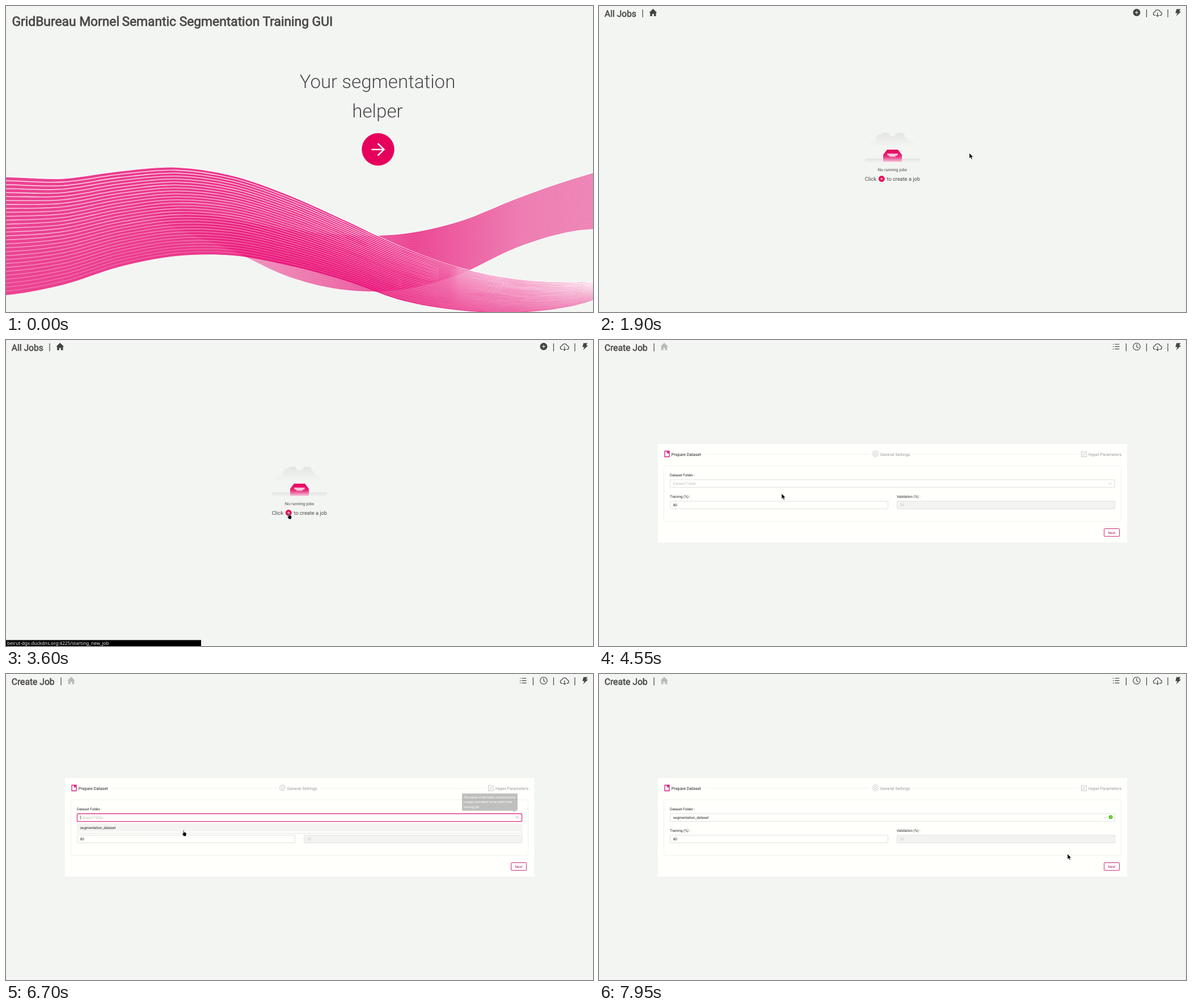
An HTML page that plays this animation: 1035 px wide and 541 px high, repeating every 8 s.

```html
<!DOCTYPE html>
<html lang="en">
<head>
<meta charset="utf-8">
<title>Segmentation helper</title>
<style>
  html, body { margin: 0; width: 100%; height: 100%; overflow: hidden; background: #f3f5f3; }
  svg { display: block; }
  text { font: 6.3px Roboto, sans-serif; fill: #222; text-rendering: geometricPrecision; white-space: pre; }
  .bold { fill: #4a4a46; stroke: #4a4a46; stroke-width: .035em; }
  .title { font-size: 22.8px; }
  .head { font-size: 15.7px; }
  .lead { font-size: 33.1px; font-weight: 300; fill: #4a4a4a; text-anchor: middle; }
  .step { font-size: 7.25px; }
  .hint { font-size: 9.25px; fill: #4a4a4a; }
  .pale { fill: #bfbfbd; }
  .url { font: 8.2px "Noto Sans", sans-serif; fill: #eee; }
  .tip { fill: #fff; }
  .box { fill: #fffffc; stroke: #d9d9d7; stroke-width: .8; }
  .line { fill: none; stroke: #444; stroke-width: 1.2; }
  .thin { fill: none; stroke: #b8b8b6; stroke-width: .8; }
  .rule { fill: none; stroke: #f0f0ed; }
</style>
</head>
<body>
<svg width="1035" height="541" viewBox="0 0 1035 541">
  <defs>
    <linearGradient id="frontFill" gradientUnits="userSpaceOnUse" x2="1035">
      <stop stop-color="#e8006e" stop-opacity=".72"/>
      <stop offset=".3" stop-color="#e8006e" stop-opacity=".77"/>
      <stop offset=".66" stop-color="#e8006e" stop-opacity=".82"/>
      <stop offset=".85" stop-color="#e8006e" stop-opacity=".7"/>
      <stop offset="1" stop-color="#e8006e" stop-opacity=".5"/>
    </linearGradient>
    <linearGradient id="backFill" gradientUnits="userSpaceOnUse" x1="200" x2="1035">
      <stop stop-color="#e8006e" stop-opacity="0"/>
      <stop offset=".26" stop-color="#e8006e" stop-opacity=".4"/>
      <stop offset=".45" stop-color="#e8006e" stop-opacity=".55"/>
      <stop offset=".62" stop-color="#e8006e" stop-opacity=".72"/>
      <stop offset=".85" stop-color="#e8006e" stop-opacity=".5"/>
      <stop offset="1" stop-color="#e8006e" stop-opacity=".46"/>
    </linearGradient>
    <linearGradient id="lineFade" gradientUnits="userSpaceOnUse" x2="1035">
      <stop stop-color="#fff"/>
      <stop offset=".4" stop-color="#fff" stop-opacity=".85"/>
      <stop offset=".6" stop-color="#fff" stop-opacity=".8"/>
      <stop offset="1" stop-color="#fff" stop-opacity=".9"/>
    </linearGradient>
    <linearGradient id="mist" x2="0" y2="1">
      <stop stop-color="#e4e5e3"/><stop offset="1" stop-color="#f3f5f3"/>
    </linearGradient>
    <linearGradient id="tray" x2="0" y2="1">
      <stop stop-color="#e6005c"/><stop offset=".55" stop-color="#ea2b7b"/><stop offset="1" stop-color="#f6c3d8"/>
    </linearGradient>
  </defs>

  <g id="welcome">
    <g id="waves"></g>
    <text class="bold title" x="10.5" y="34.5">GridBureau Mornel</text>
    <text class="bold title" x="204.5" y="34.5">Semantic Segmentation Training GUI</text>
    <text class="lead" x="655" y="145">Your segmentation</text>
    <text class="lead" x="655" y="196.5">helper</text>
    <circle id="start" cx="656" cy="253.5" r="28.7"/>
    <path d="M644.5 253.7H667M655.5 243l11 10.7-11 10.7" fill="none" stroke="#fff" stroke-width="2.5"/>
  </g>

  <g id="tools">
    <path class="line" d="M965.5 6v14M1003 6v14"/>
    <path class="line" d="M981.5 16.5h-1a3 3 0 0 1-.3-6a4.8 4.8 0 0 1 9.3 0a3 3 0 0 1-.3 6h-1.2M984.8 11.5v7M982.6 16.3l2.2 2.2 2.2-2.2"/>
    <path d="M1018.3 5.5h7l-2.3 4.2h3.3l-8.6 8.3 2.1-5.5h-3.5z" fill="#444"/>
  </g>

  <g id="jobs">
    <text class="bold head" x="9.7" y="19">All Jobs</text>
    <path class="line" d="M77 6v14"/>
    <path d="M95.3 5l7 6.8h-1.8v6.2h-3.7v-4h-3v4h-3.7v-6.2h-1.8z" fill="#444"/>
    <circle cx="948" cy="11.5" r="6.5" fill="#444"/>
    <path d="M945 11.5h6M948 8.5v6" stroke="#f3f5f3"/>
    <path d="M473 248l6-8h9v-6l4-6 6-1 2-3h10l4 6 5 1 4-3 3-4h9l4 3v4l5 2v5l11 3 5 7z" fill="url(#mist)"/>
    <path d="M469 269.5h97v8h-97z" fill="url(#mist)"/>
    <path d="M501 263l7-9h19l7 9v12.5h-33z" fill="url(#tray)"/>
    <path d="M508 261h19l-1 3.5h-2.500l-1 2h-10l-1-2h-2.500z" fill="#f9c4da"/>
    <text class="hint" x="491.8" y="291.5" style="font-size:7.3px">No running jobs</text>
    <text class="hint" x="468.8" y="309">Click</text>
    <text class="hint" x="507.5" y="309">to create a job</text>
    <circle cx="498.3" cy="305.5" r="5.4" fill="#e6005c"/>
    <path d="M495.8 305.5h5M498.3 303v5" stroke="#fff" stroke-width=".8"/>
  </g>

  <g id="create">
    <text class="bold head" x="9.7" y="19">Create Job</text>
    <path class="line" d="M97 6v14M929.5 6v14M909.5 7.5h8M909.5 11.7h8M909.5 15.9h8M906 7.5h1.5M906 11.7h1.5M906 15.9h1.5M948 7.5v4.5l3 2"/>
    <circle class="line" cx="948" cy="11.7" r="6.2"/>
    <path d="M115 5l7 6.8h-1.8v6.2h-3.7v-4h-3v4h-3.7v-6.2h-1.8z" fill="#bbb"/>
    <path d="M104 184h827v174h-827z" fill="#fffffc"/>
    <path class="rule" d="M187 202h290M553 202h292"/>
    <rect class="rule" x="114.5" y="222.5" width="806" height="98" rx="2"/>
    <path d="M116 196.5h8v10h-8z" fill="none" stroke="#d6187a" stroke-width="1.3"/>
    <path d="M120 196.5h3v4.5l-1.5-1-1.5 1z" fill="#d6187a"/>
    <path class="thin" d="M487.5 196l1.6.3.6 1.3 1.5-.2 1.2 2-.8 1.1.8 2.2-1.2 2-1.5-.2-1.1 1.9h-2.3l-1.1-1.9-1.5.2-1.2-2 .8-2.2-.8-1.1 1.2-2 1.5.2.6-1.3z"/>
    <circle class="thin" cx="487.5" cy="201.3" r="1.9"/>
    <path class="thin" d="M855.5 197h-5v9.5h9v-5M853 204l.4-2.2 5.3-5.3 1.5 1.5-5.2 5.3z"/>
    <text class="step" x="127.8" y="204.5">Prepare Dataset</text>
    <text class="step" x="495.8" y="204.5" style="fill:#999">General Settings</text>
    <text class="step" x="863" y="204.5" style="fill:#999">Hyper Parameters</text>
    <text x="125" y="240.7">Dataset Folder :</text>
    <text x="125" y="278.5">Training (%) :</text>
    <text x="525" y="278.5">Validation (%) :</text>
    <rect id="ring" x="124.7" y="246.2" width="785.6" height="15.2" rx="1.5" fill="#f7c6dd"/>
    <rect id="select" class="box" x="125.5" y="247" width="784" height="13.6" rx="1"/>
    <text id="value" x="130.8" y="255.8"></text>
    <path id="caret" d="M131.2 250v7.5" stroke="#222" stroke-width=".6"/>
    <path id="chevron" class="thin" d="M899 252.5l2.5 2.8 2.5-2.8"/>
    <path id="search" class="thin" d="M902.3 254.3l1.5 1.7M902.7 252.9a1.7 1.7 0 1 0-3.4 0a1.7 1.7 0 1 0 3.4 0"/>
    <g id="check">
      <circle r="3.5" fill="#52c41a"/>
      <path d="M-1.6 0l1.2 1.3 2-2.5" fill="none" stroke="#fff" stroke-width=".8"/>
    </g>
    <rect id="training" class="box" x="125.5" y="285" width="384" height="13.5" rx="1"/>
    <text x="130.8" y="294">80</text>
    <rect class="box" x="525.5" y="285" width="384" height="13.5" rx="1" style="fill:#f3f4f1"/>
    <text class="pale" x="530.8" y="294">20</text>
    <rect x="890.7" y="333.6" width="27" height="13.6" rx="1" fill="#fffffc" stroke="#c2246f"/>
    <text x="897.6" y="342.5" style="fill:#b81d66">Next</text>
    <g id="menu">
      <rect x="125" y="262" width="785.5" height="20.5" rx="1" fill="#e9eae7" opacity=".8"/>
      <rect x="125.5" y="262" width="784" height="18.7" rx="1" fill="#fffffc"/>
      <path d="M125.5 264h784v14.5h-784z" fill="#f4f5f2"/>
      <text x="130.8" y="273.5">segmentation_dataset</text>
    </g>
    <g id="tooltip">
      <path d="M-55 -17.7h110a1.5 1.5 0 0 1 1.5 1.5v32.4a1.5 1.5 0 0 1-1.5 1.5h-3l-2.5 2.5-2.5-2.5H-55a1.5 1.5 0 0 1-1.5-1.5v-32.4a1.5 1.5 0 0 1 1.5-1.5z" fill-opacity=".75"/>
      <text class="tip" x="-53" y="-7.8">The name of the folder containing the</text>
      <text class="tip" x="-53" y="2.2">images and labels to be used in the</text>
      <text class="tip" x="-53" y="12.2">training job</text>
    </g>
  </g>

  <g id="status">
    <rect id="bar" y="530.5" height="11"/>
    <text class="url" x="2" y="539">beirut-dgx.duckdns.org:4225/starting_new_job</text>
  </g>
  <path id="cursor" stroke-width=".5"/>
</svg>

<script>
const LOOP = 8000, TICK = 50, PINK = '#e23f8e';
const $ = id => document.getElementById(id);
const set = (id, attrs) => { for (const k in attrs) $(id).setAttribute(k, attrs[k]); };
const show = (id, on) => { $(id).style.display = on ? '' : 'none'; };
const ramp = (t, from, to) => Math.min(1, Math.max(0, (t - from) / (to - from)));
const mix = (a, b, f) => a + (b - a) * f;

// Smooth curve through heights spaced evenly by 100 px
function curve(x0, ys, dir = 1) {
  const slope = i => ((ys[i + 1] ?? ys[i]) - (ys[i - 1] ?? ys[i])) / 6;
  return ys.slice(1).map((y, i) => {
    const x = x0 + dir * 100 * i;
    return `C${x + dir * 33.3} ${ys[i] + slope(i)} ${x + dir * 66.7} ${y - slope(i + 1)} ${x + dir * 100} ${y}`;
  }).join('');
}

function ribbon(x0, top, bottom, fill, lines, width, fade) {
  const x1 = x0 + 100 * (top.length - 1), back = [...bottom].reverse();
  let out = `<path fill="url(#${fill})" d="M${x0} ${top[0]}${curve(x0, top)}L${x1} ${back[0]}${curve(x1, back, -1)}z"/>`;
  for (let i = 0; i < lines; i++) {
    const f = i / lines, ys = top.map((y, k) => mix(y, bottom[k], f));
    out += `<path fill="none" stroke="url(#lineFade)" stroke-width="${width}" opacity="${fade(f)}" d="M${x0} ${ys[0]}${curve(x0, ys)}"/>`;
  }
  return out;
}

$('waves').innerHTML =
  ribbon(200, [335, 356, 378, 395, 405, 403, 381, 341, 306, 281],
    [345, 393, 433, 479, 502, 501, 474, 427, 398, 393], 'backFill', 22, .8, () => .14) +
  ribbon(0, [302, 305, 292, 285, 300, 335, 380, 427, 463, 483, 488, 484],
    [511, 493, 461, 442, 441, 459, 486, 521, 538, 542, 530, 500], 'frontFill', 30, 1.3, f => 1 - .75 * f);

const SHAPES = {
  arrow: 'M0 0v9.5l2.2-2 1.6 3.6 1.6-.7-1.6-3.5h3z',
  hand: 'M2 0h1.3v3.6l3.5 1 .8 1.4-.8 4.7h-4l-2.7-4.2.9-.8 1 .8z',
  beam: 'M-1.5-4.5h3M0-4.5v9M-1.5 4.5h3'
};
// time, x, y
const PATH = [
  [550, 567, 404], [900, 640, 271], [1150, 640, 271], [1250, 649.5, 261.5], [1850, 649.5, 261.5],
  [1900, 653, 260], [2000, 653, 260], [2200, 628, 278], [2300, 628, 278], [2600, 481, 320],
  [2700, 481, 320], [2950, 496, 306], [3750, 496, 306], [3900, 495, 316], [4050, 495, 316],
  [4250, 482, 345], [4350, 482, 345], [4550, 322, 271.5], [4700, 322, 271.5], [5000, 312, 256],
  [5350, 310, 255], [6500, 310, 255], [6700, 310.5, 276], [7250, 310.5, 276],
  [7700, 780, 324], [7950, 826, 318]
];
// time from which each pointer shape holds
const POINTER = [[400, 'arrow'], [800, 'hand'], [1900, 'arrow'], [2850, 'hand'], [3800, 'arrow'],
  [4850, 'beam'], [6600, 'hand'], [7300, 'arrow']];

function place(t) {
  const i = PATH.findIndex(p => p[0] >= t);
  if (i <= 0) return PATH[i ? PATH.length - 1 : 0].slice(1);
  const a = PATH[i - 1], b = PATH[i], f = ramp(t, a[0], b[0]);
  return [mix(a[1], b[1], f), mix(a[2], b[2], f)];
}

function draw(t) {
  const within = (a, b) => t >= a && t < b;
  show('welcome', t < 1900);
  show('tools', t >= 1900);
  show('jobs', within(1900, 3800));
  show('create', t >= 3800);
  set('start', { fill: t >= 800 ? '#ea1570' : '#e6005c' });

  set('status', { opacity: ramp(t, 2750, 2900) - ramp(t, 4100, 4250) });
  set('bar', { width: t < 3600 ? 184 : 344 });

  const open = within(6200, 7150), focus = within(6200, 7400), hover = within(4850, 7400), chosen = t >= 7150;
  show('ring', focus);
  set('select', { style: hover ? `stroke:${PINK};stroke-width:${focus ? 1.3 : .8}` : '' });
  set('training', { style: within(4450, 4500) ? `stroke:${PINK}` : '' });
  $('value').textContent = chosen ? 'segmentation_dataset' : 'Dataset Folder';
  set('value', { class: chosen ? '' : 'pale' });
  show('caret', open && (t - 6200) % 1000 < 550);
  show('search', open);
  show('chevron', !open);
  set('chevron', { transform: `translate(${chosen ? -9 : 0} 0)` });
  set('check', { transform: `translate(902.2 253) scale(${ramp(t, 7150, 7400)})` });

  const menu = ramp(t, 6150, 6350) - ramp(t, 7100, 7300);
  set('menu', { opacity: menu, transform: `translate(0 262) scale(1 ${.8 + .2 * menu}) translate(0 -262)` });
  const tip = ramp(t, 4950, 5100) - ramp(t, 6650, 6725);
  set('tooltip', { opacity: tip, transform: `translate(853 226.5) scale(${.8 + .2 * tip})` });

  const [x, y] = place(t), shape = POINTER.filter(p => p[0] <= t).pop()?.[1];
  show('cursor', shape);
  if (shape) set('cursor', {
    d: SHAPES[shape], transform: `translate(${x} ${y})`,
    fill: '#000', stroke: shape === 'beam' ? '#222' : '#fff'
  });
}

const begin = performance.now();
function loop() {
  const t = (performance.now() - begin) % LOOP;
  draw(Math.floor(t / TICK) * TICK);
  requestAnimationFrame(loop);
}
loop();
</script>
</body>
</html>
```
